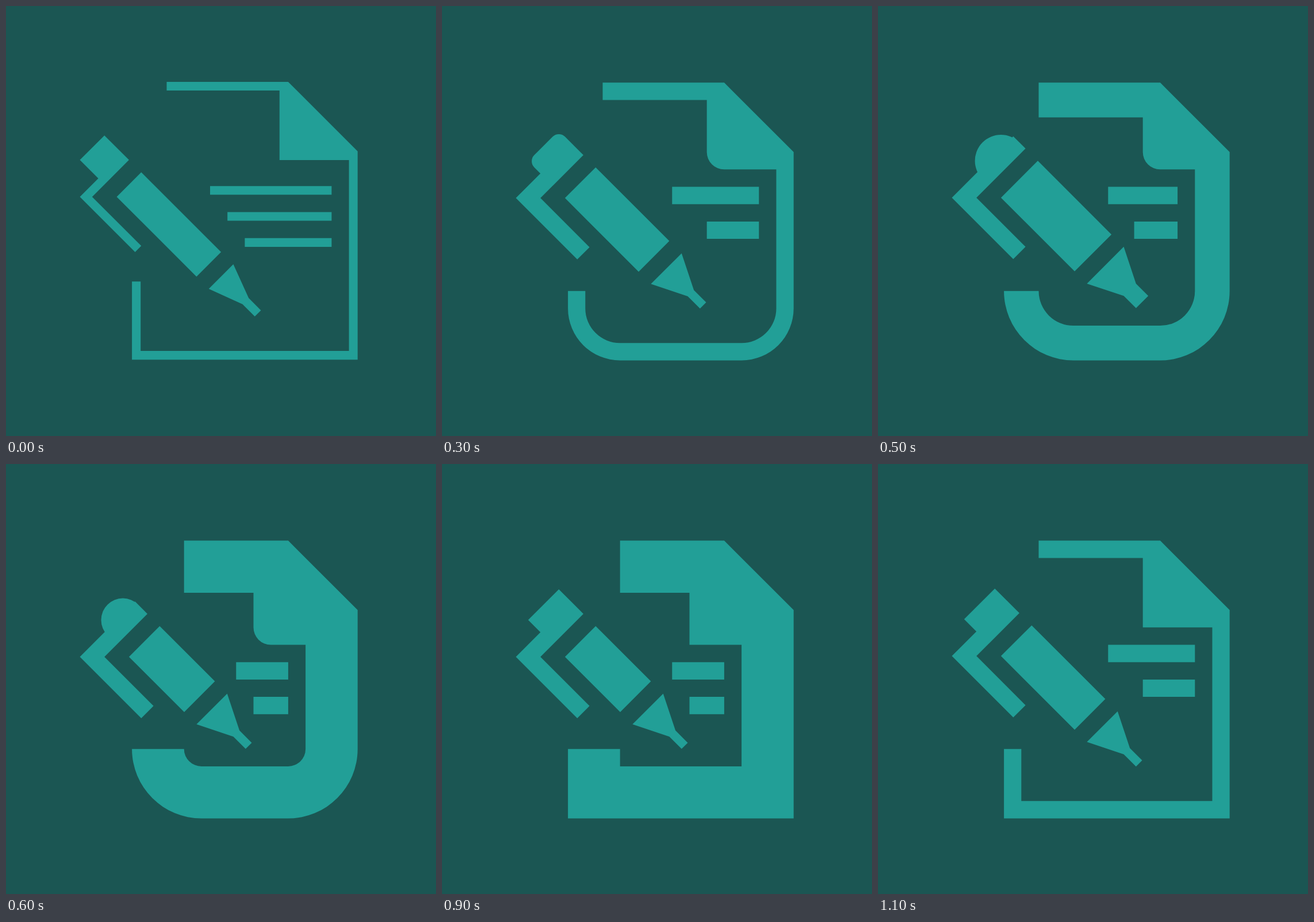
An HTML page for the animation above (1.2 s loop, 748x748 px).

```html
<!DOCTYPE html>
<html lang="en">
<head>
<meta charset="utf-8">
<title>Document icon styles</title>
<style>
  html, body { margin: 0; width: 100%; height: 100%; overflow: hidden; background: #1b5653; }
  svg { display: block; width: 100vw; height: 100vh; fill: #229f97; }
</style>
</head>
<body>
<svg viewBox="0 0 748 748">
  <path id="page"/>
  <path id="pen"/>
</svg>
<script>
const LEFT = 128.5, UNIT = 15.1, DIAG = UNIT * Math.SQRT1_2;
const STEP = 100;

// Sizes are in units of a 32 x 32 grid; lines are [x1, x2, y].
// Pen sizes run along and across its diagonal axis.
const thin = {
  w: 1, top: 10, end: 23, foldX: 23, foldY: 9,
  lines: [[15, 29, 12], [17, 29, 15], [19, 29, 18]],
  pen: { y: 199.9, t: 1, cap: 3, clip: 9, lo: 3, hi: 7, from: 3, to: 16, half: 0.5 }
};
const regular = {
  w: 2, top: 10, end: 24, foldX: 22, foldY: 10,
  lines: [[18, 28, 12], [22, 28, 16]],
  pen: { y: 200.8, t: 2, cap: 2, clip: 10, lo: 4, hi: 9, from: 4, to: 16, half: 0.5 }
};
const bold = {
  w: 4, top: 10, end: 24, foldX: 22, foldY: 10,
  lines: [[18, 26, 12], [21, 26, 16]],
  pen: { ...regular.pen, y: 200.1, hi: 10, half: 1 }
};
const black = {
  w: 6, top: 12, end: 24, foldX: 20, foldY: 12,
  lines: [[18, 24, 14], [20, 24, 18]],
  pen: { ...regular.pen, y: 202.1, to: 13 }
};

// Corner radii: page, fold, pen cap.
const sharp = { page: 0, fold: 0, cap: 0 };
const soft = { page: 3, fold: 1, cap: 0.5 };
const round = { page: 6, fold: 2, cap: 1 };
const full = { page: 8, fold: 2, cap: 3 };

const styles = [
  [thin, sharp, 132], [thin, soft], [thin, round],
  [regular, round], [regular, full], [bold, full],
  [black, full], [black, round], [black, soft],
  [black, sharp], [bold, sharp], [regular, sharp]
];

const arc = (r, sweep, x, y) => `A${r} ${r} 0 0 ${sweep} ${x} ${y}`;

function pagePath({ w, top, end, foldX, foldY, lines }, { page: r, fold: f }) {
  const q = Math.max(0, r - w), inL = 6 + w, inR = 32 - w;
  const sheet = `M${top} 0H24L32 8V${32 - r}${arc(r, 1, 32 - r, 32)}` +
    `H${6 + r}${arc(r, 1, 6, 32 - r)}V${end}H${inL}` +
    `V${inR - q}${arc(q, 0, inL + q, inR)}H${inR - q}${arc(q, 0, inR, inR - q)}` +
    `V${foldY}H${foldX + f}${arc(f, 1, foldX, foldY - f)}V${w}H${top}Z`;
  const h = Math.min(w, 2);
  return sheet + lines.map(([a, b, y]) => `M${a} ${y}H${b}v${h}H${a}Z`).join("");
}

function penPath({ t, cap, clip, lo, hi, from, to, half }, corner) {
  const r = Math.min(corner.cap, (hi - lo) / 2);
  const mid = (lo + hi) / 2, nib = to + 2;
  return `M0 0V${hi}H${t}V${t}H${clip}V0Z` +
    `M${t} ${lo}H${r - cap}${arc(r, 0, -cap, lo + r)}V${hi - r}${arc(r, 0, r - cap, hi)}H${t}Z` +
    `M${from} ${lo}V${hi}H${to}V${lo}Z` +
    `M${nib} ${lo}V${hi}L${nib + 4} ${mid + half}h2V${mid - half}h-2Z`;
}

const page = document.getElementById("page");
const pen = document.getElementById("pen");
let shown = -1;

function draw() {
  const i = Math.floor(performance.now() / STEP) % styles.length;
  if (i !== shown) {
    shown = i;
    const [weight, corner, y = 133.3] = styles[i];
    page.setAttribute("d", pagePath(weight, corner));
    page.setAttribute("transform", `translate(${LEFT} ${y}) scale(${UNIT})`);
    pen.setAttribute("d", penPath(weight.pen, corner));
    pen.setAttribute("transform",
      `matrix(${DIAG} ${DIAG} ${DIAG} ${-DIAG} ${LEFT} ${y + weight.pen.y})`);
  }
  requestAnimationFrame(draw);
}
draw();
</script>
</body>
</html>
```
